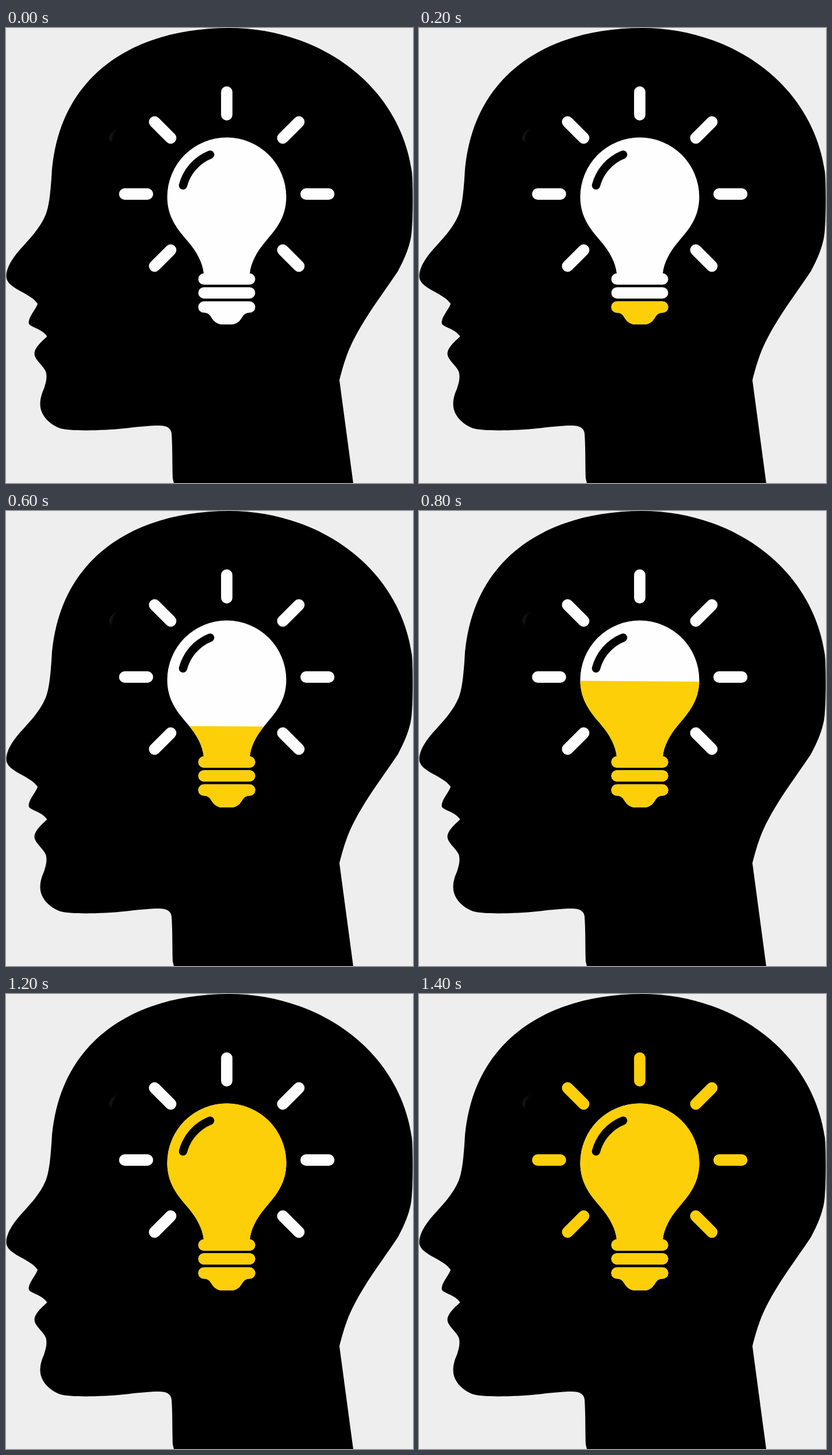
An HTML page for the animation above (1.6 s loop, 708x792 px).

```html
<!DOCTYPE html>
<html lang="en">
<head>
<meta charset="utf-8">
<title>Idea</title>
<style>
html, body { margin: 0; width: 100%; height: 100%; overflow: hidden; background: #eee; }
svg { display: block; width: 708px; height: 792px; }
</style>
</head>
<body>
<svg viewBox="0 0 708 792">
  <defs>
    <g id="bulb">
      <path d="M344 428C342 408 332 390 316 371C298 350 280.5 329 280.5 294A103.5 103.5 0 0 1 487.5 294C487.5 329 470 350 452 371C436 390 426 408 424 428Z"/>
      <rect x="334.5" y="427" width="99" height="19.8" rx="9.9"/>
      <rect x="334.5" y="451.2" width="99" height="19.8" rx="9.9"/>
      <path d="M344.3 475.8H423.7A9.9 9.9 0 0 1 423.7 495.6C412 496 412 505 405 511Q399 516 392 516H376Q369 516 363 511C356 505 356 496 344.3 495.6A9.9 9.9 0 0 1 344.3 475.8Z"/>
    </g>
    <clipPath id="filled"><polygon id="liquid"/></clipPath>
    <linearGradient id="sheen" x2="1" y2=".3">
      <stop stop-color="#1c1c1c"/><stop offset="1" stop-color="#000"/>
    </linearGradient>
  </defs>
  <path d="M388 0C225 0 88 80 79 262C77 288 75 310 69 325C59 349 41 367 24 386C10 402 .5 418 .5 432C.5 454 42 460 55 480C52 490 39.5 502 39.5 513C39.5 521 62 522 71.5 537C64 544 49.5 556 49.5 567C49.5 578 66 588 69.5 599C72 610 69 618 66 628C62 637 59.5 645 59.5 655C59.5 676 79 692 95 697C111 702 168 701 205 697C232 694 250 692 266 692C279 692 287 696 288 706C290 735 289 765 290 784L292 792H604L580 613C588 582 594 564 604 544C626 500 659 458 682 423C692 404 705 377 706 350C708 325 708 270 706 250C684 97 543 0 388 0Z"/>
  <path d="M195 175C186 177 179 184 180 194L184 199Q184 185 195 175Z" fill="url(#sheen)"/>
  <path id="rays" fill="none" stroke-width="19.8" stroke-linecap="round"
    d="M384 111.5V151M206.5 289H246M522 289H561.5M258.5 163.5L286.5 191.5M509.5 163.5L481.5 191.5M286.5 386.5L258.5 414.5M481.5 386.5L509.5 414.5"/>
  <use href="#bulb" fill="#fefefe"/>
  <use href="#bulb" fill="#fdcf09" clip-path="url(#filled)"/>
  <path d="M308 274A79 79 0 0 1 355 220.5" fill="none" stroke="#000" stroke-width="14.5" stroke-linecap="round"/>
</svg>
<script>
const STEP = 200;
// liquid surface height at the left and right edge of the bulb, per step
const levels = [[520, 520], [473, 473], [449, 449], [374, 375.5], [295.5, 297], [212.5, 212.5], [180, 180], [180, 180]];
const liquid = document.getElementById("liquid");
const rays = document.getElementById("rays");

function draw(now) {
  const step = Math.floor(now / STEP) % levels.length;
  const [left, right] = levels[step];
  liquid.setAttribute("points", `280,${left} 488,${right} 488,520 280,520`);
  rays.setAttribute("stroke", step === levels.length - 1 ? "#fdcf09" : "#fefefe");
}

function tick() {
  draw(performance.now());
  requestAnimationFrame(tick);
}
tick();
</script>
</body>
</html>
```
